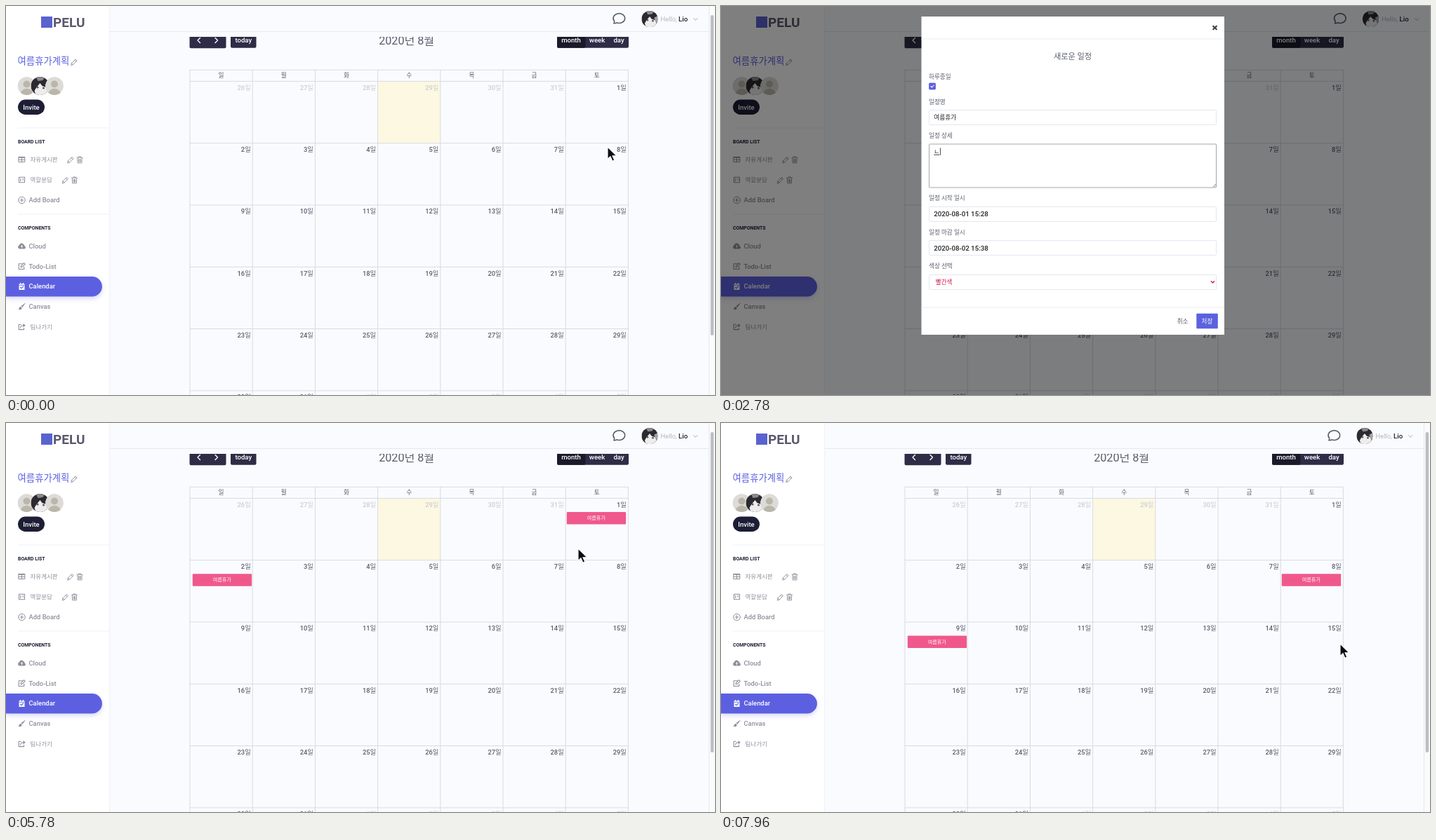
Animation, 1010 px wide and 555 px high, one loop 8 s. Source, as an HTML page:

```html
<!DOCTYPE html>
<html lang="ko">
<head>
<meta charset="utf-8">
<style>
html, body { margin: 0; width: 100%; height: 100%; overflow: hidden; background: #fff; }
svg { display: block; width: 1010px; height: 555px; }
text { font-family: Roboto, 'Noto Sans CJK KR', 'Noto Sans CJK', sans-serif; font-weight: 500; white-space: pre; }
.mid { text-anchor: middle; }
.end { text-anchor: end; }
.bold { font-weight: 700; }
.thin { font-weight: 400; }
.line { fill: none; stroke-linecap: round; stroke-linejoin: round; }
</style>
</head>
<body>
<svg id="stage" viewBox="0 0 1010 555"></svg>
<script>
const LOOP = 8000, LEFT = 262, TOP = 107.4, COL = 89.2, ROW = 88.3;
const INDIGO = '#5c61e0', GREY = '#8d8f9b', INK = '#5a5d6d', PINK = '#f0588b';

const text = (s, x, y, size, fill, cls = '') =>
  `<text x="${x}" y="${y}" font-size="${size}" fill="${fill}" class="${cls}">${s}</text>`;
const rect = (x, y, w, h, fill, extra = '') =>
  `<rect x="${x}" y="${y}" width="${w}" height="${h}" fill="${fill}" ${extra}/>`;
const circle = (x, y, r, fill, extra = '') => `<circle cx="${x}" cy="${y}" r="${r}" fill="${fill}" ${extra}/>`;
const line = (d, color, width = 1) => `<path class="line" d="${d}" stroke="${color}" stroke-width="${width}"/>`;
const shape = (d, fill, extra = '') => `<path d="${d}" fill="${fill}" ${extra}/>`;
const at = (x, y, inner) => `<g transform="translate(${x} ${y})">${inner}</g>`;

// Icons are centred on their own origin
const icons = {
  pencil: c => line('M-4.2 4.2L-3.6 1.5 2-4.1 4.1-2-1.5 3.6ZM.7-2.8L2.8-.7M-3.6 1.5L-1.5 3.6', c, .9),
  trash: c => line('M-4-3.3H4M-1.5-3.5V-4.6H1.5V-3.5M-3.2-3L-2.9 4.4H2.9L3.2-3M-1.3-1V2.8M0-1V2.8M1.3-1V2.8', c, .9),
  table: c => line('M-4.3-3.6H4.3V3.6H-4.3ZM-4.3.4H4.3M0-3.6V3.6', c) + rect(-4.5, -4, 9, 1.8, c),
  board: c => line('M-4-3.8H4V3.8H-4ZM-1.7-1.8V1.8M1.7-1.8V.2', c, 1.1),
  plus: c => line('M-2.3 0H2.3M0-2.3V2.3', c) + circle(0, 0, 4.8, 'none', `stroke="${c}"`),
  cloud: c => shape('M-3.3 4A2.7 2.7 0 0 1-3.6-1.2 3.3 3.3 0 0 1 2.5-2.4 2.6 2.6 0 0 1 4 .1 2 2 0 0 1 3.6 4Z', c) + line('M0 2.6V-.6M-1.3.5L0-.8 1.3.5', '#fff', .9),
  edit: c => line('M1-3.5H-4.3V4.2H3.3V1M-1.5 1.4L-1.2-.5 3-4.7 4.7-3 .5 1.1Z', c, 1.1),
  calendar: c => shape('M-4-3.5H-2.6V-5H-1.3V-3.5H1.3V-5H2.6V-3.5H4V5H-4Z', c) + line('M-2 1.5L-.6 2.9 2.2 0', INDIGO, 1.1) + rect(-4, -2.1, 8, .8, INDIGO),
  brush: c => shape('M4.8-5L5-4.5.8 1.2-1-.6ZM-1.6.2L.2 2C0 4.5-2.6 5-5 4-3.2 3-4 .6-1.6.2Z', c),
  exit: c => line('M-1.3-3.4H-4.3V4H3V2M-1.8 1.5C-1.8-1 0-1.8 2.6-1.8', c, 1.1) + shape('M2-4.6L5.2-1.8 2 1Z', c),
};
const icon = (name, x, y, color = GREY) => at(x, y, icons[name](color));

const person = x => `<g clip-path="url(#round)" transform="translate(${x} 114)">` +
  circle(0, 0, 13, '#dddbd8') + circle(0, -2.5, 5, '#bab7aa') + circle(0, 13, 9.3, '#bab7aa') + '</g>';
const cat = (x, y, scale) => `<g transform="translate(${x} ${y}) scale(${scale})"><g clip-path="url(#round)">` +
  rect(-13, -13, 26, 26, '#2b2a31') + shape('M-6-13H7L4-8-3-7Z', '#8b898e') +
  shape('M0-4L3 0 9 2 11 8 5 13H-6L-8 7-5 2Z', '#eeecec') + shape('M7-2L13-5V9L10 5Z', '#a5a3a6') +
  circle(-3.5, 2, 1.5, '#55535a') + circle(5, 3, 1.5, '#55535a') + '</g></g>';

function sidebar() {
  const row = (name, label, y, x = 32.5, color = GREY) => icon(name, 22.5, y, color) + text(label, x, y + 3.3, x > 33 ? 8.5 : 9.4, color);
  return rect(0, 0, 147, 555, '#fff') + rect(147, 0, 1, 555, '#eef2f7') +
    rect(50, 15, 16, 16, '#5a62d0') + text('PELU', 67, 30, 19, '#5a586c', 'bold') +
    text('여름휴가계획', 16.5, 82.5, 13.4, INDIGO) + icon('pencil', 97, 80) +
    person(29.5) + cat(48.5, 114, 1) + person(69) +
    rect(17, 133.5, 38, 21.5, '#1d1e35', 'rx="10.7"') + text('Invite', 36, 147.5, 9.5, '#fff', 'mid') +
    rect(17, 173.5, 130, 1, '#eff1f5') + text('BOARD LIST', 17, 195.8, 6.9, '#1a1d33', 'bold') +
    row('table', '자유게시판', 219, 34.5) + icon('pencil', 92, 219.5) + icon('trash', 105, 219.5) +
    row('board', '역할분담', 248, 34.5) + icon('pencil', 84.5, 248.5) + icon('trash', 97.5, 248.5) +
    row('plus', 'Add Board', 277) +
    rect(17, 296.5, 130, 1, '#eff1f5') + text('COMPONENTS', 17, 319.2, 6.9, '#1a1d33', 'bold') +
    row('cloud', 'Cloud', 342.5) + row('edit', 'Todo-List', 371.3) +
    shape('M0 386H122.7A14.2 14.2 0 0 1 122.7 414.5H0Z', INDIGO, 'filter="url(#glow)"') +
    row('calendar', 'Calendar', 400, 32.5, '#fff') + row('brush', 'Canvas', 428.8) + row('exit', '팀나가기', 457.6, 34.5);
}

function toolbar() {
  const dark = '#2e2c46';
  return '<g clip-path="url(#below)">' +
    rect(261.5, 30, 52, 30.3, dark, 'rx="2"') + rect(320, 30, 36.5, 29.7, dark, 'rx="2"') +
    rect(785, 30, 102, 29.7, dark, 'rx="2"') + rect(785, 30, 40.5, 29.7, '#1a1a2b', 'rx="2"') +
    line('M276.5 45.5L273 49 276.5 52.5M298 45.5L301.5 49 298 52.5', '#fff', 1.4) +
    text('today', 338.3, 52.3, 9.6, '#fff', 'mid') + text('month', 805, 52.3, 9.6, '#fff', 'mid') +
    text('week', 842, 52.3, 9.6, '#fff', 'mid') + text('day', 873, 52.3, 9.6, '#fff', 'mid') +
    text('2020년 8월', 570.7, 54.5, 16.1, INK, 'mid thin') + '</g>';
}

function grid() {
  let out = '', paths = 'M262 91.3H886.4';
  for (let i = 0; i < 8; i++) paths += `M${LEFT + i * COL} 91.3V555`;
  for (let i = 0; i < 6; i++) paths += `M262 ${TOP + i * ROW}H886.4`;
  out += line(paths, '#d9dbde');
  [...'일월화수목금토'].forEach((d, i) => out += text(d, LEFT + (i + .5) * COL, 102, 8.7, INK, 'mid'));
  for (let i = 0; i < 42; i++) {
    const day = i < 6 ? 26 + i : (i - 6) % 31 + 1;
    const color = i < 6 || i > 36 ? '#cbcdd2' : INK;
    out += text(day + '일', LEFT + (i % 7 + 1) * COL - 2.5, TOP + Math.floor(i / 7) * ROW + 12.4, 9.3, color, 'end');
  }
  return out;
}

function header() {
  return shape('M865.8 24.6Q867.2 23.4 866.6 21.6A8.3 6.9 0 1 1 869.8 23.8Q868 25.2 865.8 24.6Z', 'none', 'stroke="#5d6069" stroke-width="1.6" stroke-linejoin="round"') +
    cat(917, 18.5, .89) + text('Hello,', 932.5, 21.8, 9.4, '#b4b7c2', 'thin') + text('Lio', 958, 21.8, 9.6, '#171c30') +
    line('M979.5 17.5L982.3 20.3 985 17.5', '#a9adb9');
}

function dialog() {
  const label = (s, y) => text(s, 296, y, 8.6, INK);
  const field = (id, y, h) => `<rect id="${id}" x="296.5" y="${y}" width="409" height="${h}" rx="1" fill="#fff" stroke="#e2e7f0"/>`;
  return rect(285.5, 15, 431.5, 454, '#fff') + rect(285.5, 46.5, 431.5, 1, '#e9edf4') + rect(285.5, 429.5, 431.5, 1, '#e9edf4') +
    line('M701.2 28.7L705.8 33.3M705.8 28.7L701.2 33.3', '#444', 2.2) +
    text('새로운 일정', 501, 76, 11.2, INK, 'mid') +
    label('하루종일', 103.6) + label('일정명', 139.6) + label('일정 상세', 188.2) +
    label('일정 시작 일시', 277.4) + label('일정 마감 일시', 326) + label('색상 선택', 374.4) +
    field('nameBox', 148.5, 21) + field('noteBox', 197, 62) + field('', 286.5, 21) + field('', 334.5, 21) + field('colorBox', 383.5, 21) +
    line('M701 258L705 254M703.5 258L705 256.5', '#777', .8) +
    text('2020-08-01 15:28', 303.3, 300.3, 9.7, '#222') + text('2020-08-02 15:38', 303.3, 348.8, 9.7, '#222') +
    line('M698.3 392.8L700.5 395 702.7 392.8', '#d1124a', 1.3) +
    text('취소', 657.6, 452.5, 8.6, INK, 'mid') + rect(677.3, 438.7, 30.5, 21.6, INDIGO, 'rx="1"') +
    text('저장', 692.5, 452.5, 8.6, '#fff', 'mid') + '<g id="values"></g>';
}

const BEAM = 'M-3-9.5Q0-9.5 0-7 0-9.5 3-9.5M0-7V7M-3 9.5Q0 9.5 0 7 0 9.5 3 9.5M-2 2H2';
const pointers = {
  arrow: shape('M0 0V17.5L4 13.8 6.8 20.3 9.8 19 7 12.7H12.6Z', '#0b0b12', 'stroke="#fff" stroke-width="1.1"'),
  beam: line(BEAM, '#fff', 3.2) + line(BEAM, '#111', 1.3),
  hand: shape('M-1.5 1Q0-1 1.6 1L3.2 7.2Q5.5 5.5 6.7 7.3 9 6 10 8 12.5 7.3 13 10L12.5 15 11 20H2.5L-2.5 14-4.8 10.5Q-3.5 8.5-.5 11.5Z', '#fff', 'stroke="#111" stroke-width="1.2"') +
    line('M4.3 13V17M6.8 13V17M9.3 13V17', '#111', 1),
};

stage.innerHTML = `<defs>
  <clipPath id="round"><circle r="13"/></clipPath>
  <clipPath id="below"><rect y="44" width="1010" height="511"/></clipPath>
  <filter id="glow" x="-10%" y="-50%" width="120%" height="220%"><feDropShadow dx="0" dy="3" stdDeviation="3" flood-color="${INDIGO}" flood-opacity=".25"/></filter>
  </defs>` +
  rect(0, 0, 1010, 555, '#f9fbfe') + rect(148, 36, 862, 1, '#e4eaf2') +
  rect(LEFT + 3 * COL, TOP, COL, ROW, '#fcf8e1') + '<g id="marked"></g>' +
  toolbar() + grid() + '<g id="events"></g>' + sidebar() + `<g id="user">${header()}</g>` +
  `<g id="scrollbar">${rect(1001, 0, 9, 555, '#fafbfc') + rect(1001, 0, 1, 555, '#e6e8ec') + rect(1003.7, 13, 4.5, 457, '#bcbec1', 'rx="2.2"')}</g>` +
  rect(0, 0, 1010, 555, '#000', 'id="shade"') + `<g id="modal">${dialog()}</g>` + '<g id="pointer"></g>';

const $ = id => document.getElementById(id);
const cache = {};
const fill = (id, html) => { if (cache[id] !== html) $(id).innerHTML = cache[id] = html; };
const ramp = (t, a, b) => Math.max(0, Math.min(1, (t - a) / (b - a)));
const within = (t, a, b) => t >= a && t < b;

const moves = [[0, 857, 201], [220, 845, 150], [290, 845, 150], [600, 309, 221], [960, 309, 221], [1130, 300, 114],
  [1300, 300, 114], [1480, 350, 160], [3340, 350, 215], [3550, 340, 394], [3700, 340, 394], [3900, 335, 486],
  [4000, 335, 486], [4500, 672, 463], [4650, 690, 450], [4950, 690, 450], [5780, 815, 179], [6100, 853.5, 140.5],
  [6250, 853.5, 140.5], [6820, 857, 221], [7080, 857, 221], [7800, 882, 315], [LOOP, 882, 315]];
function position(t) {
  const i = moves.findIndex(m => m[0] > t);
  const [t0, x0, y0] = moves[i - 1], [t1, x1, y1] = moves[i];
  const k = ramp(t, t0, t1), e = k * k * (3 - 2 * k);
  return [x0 + (x1 - x0) * e, y0 + (y1 - y0) * e];
}
const cellAt = ([x, y]) => Math.floor((y - TOP) / ROW) * 7 + Math.min(6, Math.floor((x - LEFT) / COL));

const nameSteps = 'ㅇ 여 열 여르 여름 여름ㅎ 여름후 여름휴 여름휵 여름휴가'.split(' ');
const noteSteps = 'ㄴ 노 놀 놀ㄹ 놀러 놀럭 놀러가 놀러간 놀러가느 놀러가는 놀러가는ㄴ 놀러가는나 놀러가는날 놀러가는날! 놀러가는날!~'.split(' ');
function typed(steps, t, start, pace, blur, y) {
  const s = steps[Math.min(steps.length - 1, Math.floor((t - start) / pace))] || '';
  const body = s.replace(/[ㄱ-힣]$/, c => t < blur ? `<tspan text-decoration="underline">${c}</tspan>` : c);
  const width = [...s].reduce((w, c) => w + (c === '!' ? 2.4 : c === '~' ? 5.5 : 8), 0);
  return text(body, 303.3, y, 8.7, '#222') + (t < blur ? rect(304 + width, y - 8.5, .8, 10.5, '#222') : '');
}

function eventBar(x, y, opacity = 1) {
  return `<g opacity="${opacity}">${rect(x, y, 84.3, 17.5, PINK, 'rx="1"')}</g>` + text('여름휴가', x + 42, y + 11.2, 7.1, '#fff', 'mid');
}
function eventPair(i) {
  const y = TOP + Math.floor(i / 7) * ROW + 19.5;
  return eventBar(798.8, y) + eventBar(265.8, y + ROW);
}

function formValues(t) {
  const checked = t >= 1180;
  let out = rect(296.5, 110, 9, 9, checked ? INDIGO : '#fff', `rx="1" stroke="${checked ? INDIGO : '#9a9ca5'}" stroke-width=".8"`);
  if (checked) out += line('M299 114.5L300.5 116 303.2 113', '#fff', 1.1);
  out += t < 1720 ? text('일정명을 입력해 주세요', 303.3, 162, 8.7, '#a2a8b8') : typed(nameSteps, t, 1720, 70, 2560, 162);
  if (t >= 2760) out += typed(noteSteps, t, 2760, 40, 3500, 210.8);
  if (t >= 3340) out += '<path d="M303.5 212.5H343" stroke="#e0284a" stroke-width="1.3" stroke-dasharray="1.4 1"/>';
  return out + text(t < 3950 ? '빨간색' : '핑크색', 305.8, 396.8, 8.6, '#d1124a');
}

function draw(t) {
  const pos = position(t);
  const dragging = within(t, 6270, 7080);

  let first = 0, last = -1;
  if (within(t, 250, 1080)) {
    const hover = cellAt(position(Math.min(t, 700)));
    first = Math.min(6, hover);
    last = Math.max(6, hover);
  } else if (dragging) {
    first = cellAt(pos);
    last = first + 1;
  }
  let cells = '';
  for (let i = first; i <= last; i++) cells += rect(LEFT + i % 7 * COL, TOP + Math.floor(i / 7) * ROW, COL, ROW, '#bce8f1', 'opacity=".3"');
  fill('marked', cells);
  fill('events', dragging ? eventBar(pos[0] - 54.5, pos[1] - 13.2, .75) : t < 5150 ? '' : eventPair(t < 7080 ? 6 : 13));

  const locked = within(t, 640, 5010);
  $('user').setAttribute('transform', `translate(${locked ? 8.5 : 0} 0)`);
  $('scrollbar').setAttribute('opacity', locked ? 0 : 1);
  $('shade').setAttribute('opacity', .5 * (ramp(t, 640, 707) - ramp(t, 4920, 5010)));

  const open = ramp(t, 707, 840), close = ramp(t, 4850, 4920);
  const lift = -43 * ((1 - open) ** 1.7 + close ** 1.7);
  $('modal').setAttribute('opacity', open - close);
  $('modal').setAttribute('transform', `translate(0 ${lift})`);
  if (locked) fill('values', formValues(t));
  const focus = (id, on) => $(id).setAttribute('stroke', on ? '#a3a6ad' : '#e2e7f0');
  focus('nameBox', within(t, 1560, 2600));
  focus('noteBox', within(t, 2600, 3560));
  focus('colorBox', t >= 3560);

  const hidden = within(t, 1700, 3340);
  const beam = within(t, 720, 1020) || within(t, 1430, 1700);
  const hand = within(t, 4600, 4950) || within(t, 6040, 7150);
  fill('pointer', hidden ? '' : pointers[beam ? 'beam' : hand ? 'hand' : 'arrow']);
  $('pointer').setAttribute('transform', `translate(${pos})`);
}

function tick() {
  draw(performance.now() % LOOP);
  requestAnimationFrame(tick);
}
tick();
</script>
</body>
</html>
```
